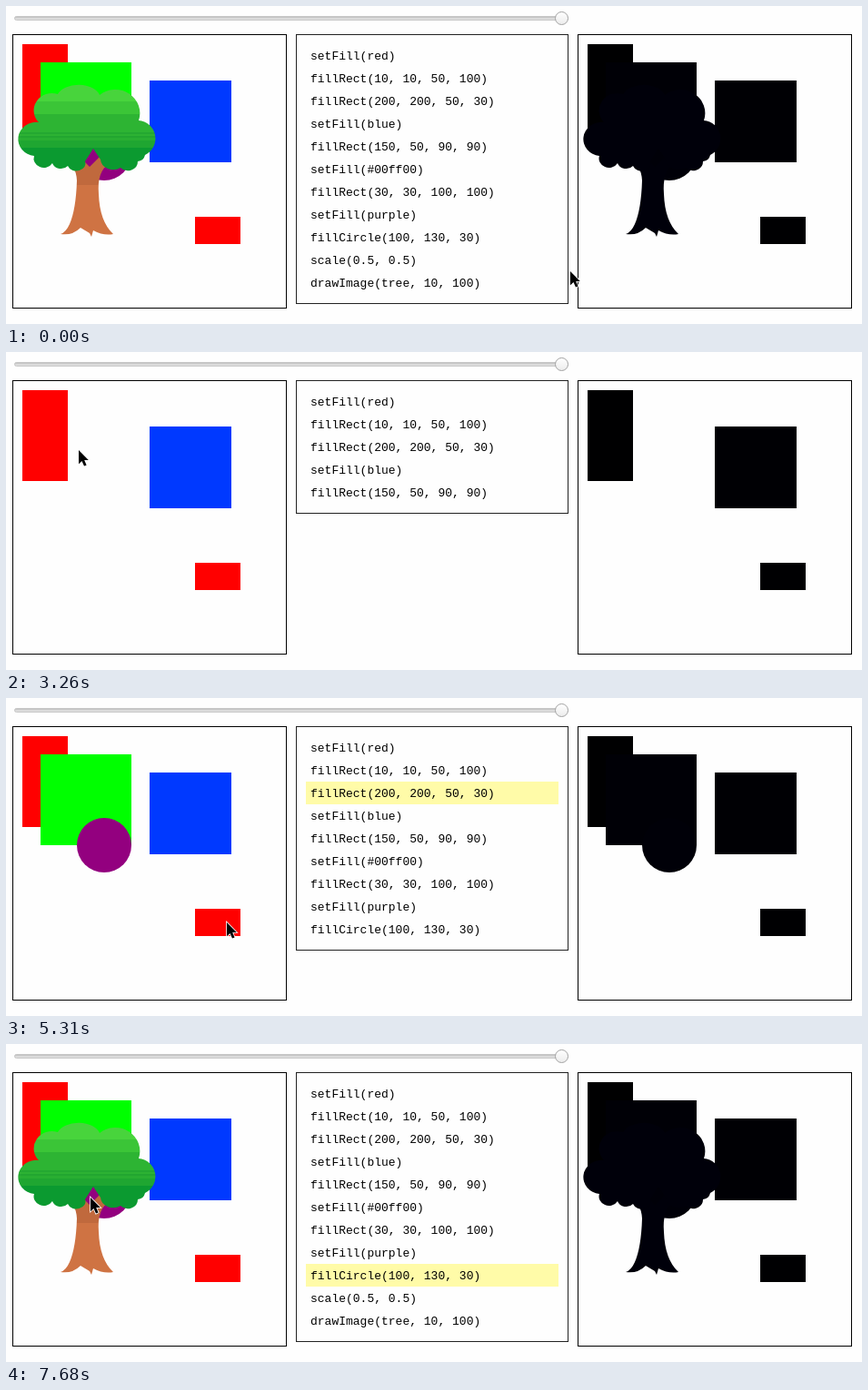
Animation, 942 px wide and 350 px high, one loop 8 s. Source, as an HTML page:

```html
<!DOCTYPE html>
<html lang="en">
<head>
<meta charset="utf-8">
<title>Canvas command list</title>
<style>
html, body { margin: 0; width: 100%; height: 100%; overflow: hidden; background: #fefefe; }
svg { display: block; }
text { font: 13px "Liberation Mono", "Courier New", monospace; white-space: pre; }
</style>
</head>
<body>
<svg id="stage" width="942" height="350" viewBox="0 0 942 350">
  <defs>
    <linearGradient id="track" x2="0" y2="1">
      <stop stop-color="#b4b4b4"/><stop offset=".5" stop-color="#d8d8d8"/><stop offset="1" stop-color="#e6e6e6"/>
    </linearGradient>
    <linearGradient id="knob" x2="0" y2="1">
      <stop stop-color="#fff"/><stop offset="1" stop-color="#ececec"/>
    </linearGradient>
    <linearGradient id="leaves" gradientUnits="userSpaceOnUse" x1="0" y1="0" x2="0" y2="100"></linearGradient>
    <linearGradient id="bark" gradientUnits="userSpaceOnUse" x1="0" y1="0" x2="0" y2="172">
      <stop offset=".669" stop-color="#c0693d"/><stop offset=".669" stop-color="#cf7343"/>
    </linearGradient>
  </defs>
  <rect x="9.5" y="11.5" width="609" height="4" rx="2" fill="url(#track)" stroke="#c6c6c6"/>
  <circle id="thumb" cy="13.5" r="7" fill="url(#knob)" stroke="#a2a2a2"/>
  <g fill="none" stroke="#000">
    <rect x="7.5" y="31.5" width="301" height="301"/>
    <rect x="629.5" y="31.5" width="301" height="301"/>
    <rect id="panel" x="319.5" y="31.5" width="299" stroke="#222"/>
  </g>
  <rect id="mark" x="330" width="278" height="25" fill="#fffba8"/>
  <g id="list"></g>
  <g id="picture" transform="translate(8 32)"></g>
  <g id="pick" transform="translate(630 32)"></g>
  <path id="arrow" d="M0 0V15.2L3.5 12L6 17.6L8.6 16.4L6.2 11H10.8Z" stroke="#fff" stroke-width="1.6" paint-order="stroke"/>
  <g id="beam" fill="none">
    <path id="beamShape" d="M-3 -8Q0 -8 0 -6Q0 -8 3 -8M0 -6V6M-3 8Q0 8 0 6Q0 8 3 8M-2 2H2" stroke="#fff" stroke-opacity=".5" stroke-width="2.4"/>
    <use href="#beamShape" style="stroke:#111"/>
    <path d="M-3 -8Q0 -8 0 -6Q0 -8 3 -8M0 -6V6M-3 8Q0 8 0 6Q0 8 3 8M-2 2H2" stroke="#111" stroke-width="1.2"/>
  </g>
</svg>
<script>
const LOOP = 8000, STEP = 147.4;
const $ = id => document.getElementById(id);

const commands = [
  "setFill(red)", "fillRect(10, 10, 50, 100)", "fillRect(200, 200, 50, 30)",
  "setFill(blue)", "fillRect(150, 50, 90, 90)",
  "setFill(#00ff00)", "fillRect(30, 30, 100, 100)",
  "setFill(purple)", "fillCircle(100, 130, 30)",
  "scale(0.5, 0.5)", "drawImage(tree, 10, 100)"
];
const colors = { red: "#f00", blue: "#0039ff", purple: "#93007f" };

// Step at which each command arrives
const arrivals = [9, 12, 15, 18, 22, 25, 28, 32, 35, 38, 42];
// [step, highlighted row]
const hovers = [[0, -1], [24, 1], [30, 4], [34, 2], [45, 10], [52, 8]];
// [step, x, y] of the pointer
const route = [
  [0, 621, 292], [1, 621, 292], [2, 620, 291], [3, 619, 290], [4, 619, 290],
  [5, 610, 288], [6, 588, 270], [8, 470, 192], [10, 376, 142], [11, 376, 142],
  [12, 374, 140], [13, 372, 137], [17, 372, 137], [18, 366, 137], [19, 335, 135],
  [22, 80, 108], [23, 50, 103], [25, 55, 104], [28, 217, 127], [30, 226, 140],
  [33, 236, 232], [34, 241, 243], [35, 243, 247], [36, 243, 247], [37, 234, 236],
  [39, 140, 172], [41, 70, 158], [42, 107, 162], [43, 110, 152],
  [45, 100, 132], [47, 86, 150], [49, 93, 169], [60, 93, 169]
];

const trunk = "M50 86Q64 92 65 110Q64 142 57 158Q53 167 47 169Q60 171 69 162Q74 165 79 168L81 172L83 165" +
  "Q94 171 105 169Q90 155 89 125Q87 100 100 92L92 82L79 95L71 87Z";
const crown = "M44 15A24 15 0 0 1 90 16A27 26 0 0 1 133 44A20 20 0 0 1 140 82A9 9 0 0 1 132 89" +
  "A11 10 0 0 1 113 96A14 12 0 0 1 91 87L83 75L74 89A10 8 0 0 1 55 94A10 9 0 0 1 38 91" +
  "A11 10 0 0 1 18 83A20 18.5 0 0 1 23 46A20 19 0 0 1 44 15Z";

// Colour bands of the crown: [top, colour]
const bands = [[0, "#48d43c"], [23, "#3bc537"], [37, "#2db433"], [57, "#24a831"], [59, "#2cb233"],
  [61, "#22a630"], [63, "#29ae32"], [66, "#1fa631"], [74, "#0b9a30"], [100, ""]];
$("leaves").innerHTML = bands.slice(0, -1).map(([y, c], i) =>
  `<stop offset="${y}%" stop-color="${c}"/><stop offset="${bands[i + 1][0]}%" stop-color="${c}"/>`).join("");

function shape(name, args, fill, flat) {
  const [a, b, c, d] = args.map(Number);
  if (name === "fillRect") return `<rect x="${a}" y="${b}" width="${c}" height="${d}" fill="${fill}"/>`;
  if (name === "fillCircle") return `<circle cx="${a}" cy="${b}" r="${c}" fill="${fill}"/>`;
  if (name !== "drawImage") return "";
  return `<g transform="translate(${b / 2} ${c / 2})"><path d="${trunk}" fill="${flat ? fill : "url(#bark)"}"/>` +
    `<path d="${crown}" fill="${flat ? fill : "url(#leaves)"}"/></g>`;
}

let fill = "";
commands.forEach((text, i) => {
  const [, name, list] = text.match(/(\w+)\((.*)\)/), args = list.split(", ");
  if (name === "setFill") fill = colors[args[0]] || args[0];
  $("list").innerHTML += `<text x="335" y="${59 + 25 * i}">${text}</text>`;
  $("picture").innerHTML += `<g>${shape(name, args, fill, false)}</g>`;
  $("pick").innerHTML += `<g>${shape(name, args, `rgb(0,0,${i})`, true)}</g>`;
});

const show = (el, on) => el.setAttribute("visibility", on ? "visible" : "hidden");

function pointer(n) {
  const i = route.findIndex(k => k[0] > n), [n0, x0, y0] = route[i - 1], [n1, x1, y1] = route[i];
  const p = (n - n0) / (n1 - n0);
  return [Math.round(x0 + (x1 - x0) * p), Math.round(y0 + (y1 - y0) * p)];
}

function render(t) {
  const n = Math.floor(t / STEP);
  const count = n < 5 ? commands.length : arrivals.filter(a => a <= n).length;
  for (const id of ["list", "picture", "pick"])
    [...$(id).children].forEach((el, i) => show(el, i < count));
  $("panel").setAttribute("height", 21 + 25 * count);
  $("thumb").setAttribute("cx", count < 2 ? 16.5 : 611.5);

  const row = hovers.filter(h => h[0] <= n).pop()[1];
  show($("mark"), row >= 0);
  $("mark").setAttribute("y", 42 + 25 * row);

  const typing = n === 42 || n === 43;
  show($("arrow"), !typing);
  show($("beam"), typing);
  const place = `translate(${pointer(n).join(" ")})`;
  $("arrow").setAttribute("transform", place);
  $("beam").setAttribute("transform", place);
}

const start = performance.now();
function tick() {
  render((performance.now() - start) % LOOP);
  requestAnimationFrame(tick);
}
render(0);
requestAnimationFrame(tick);
</script>
</body>
</html>
```
